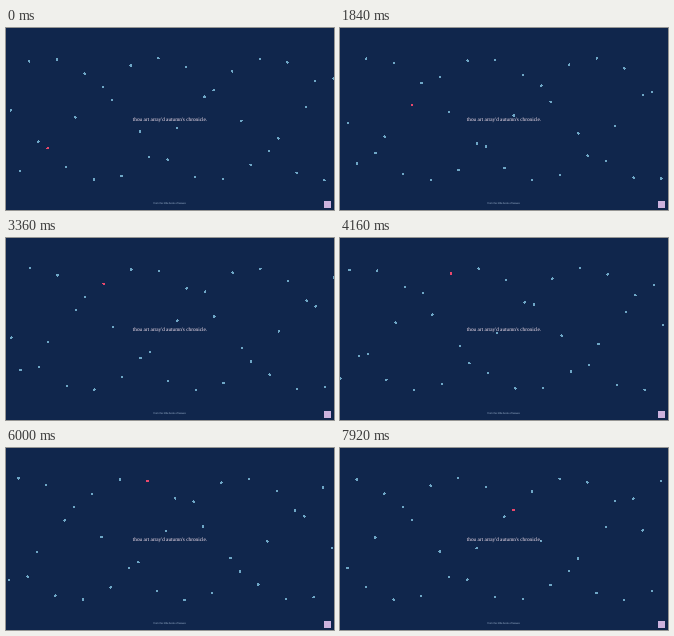
An HTML page for the animation above (8 s loop, 328x182 px).

```html
<!DOCTYPE html>
<html lang="en">
<head>
<meta charset="utf-8">
<title>Drifting dots</title>
<style>
  html, body { margin: 0; height: 100%; overflow: hidden; background: #10264c; }
  svg { display: block; width: 100vw; height: 100vh; }
  text { text-anchor: middle; text-rendering: geometricPrecision; }
  circle, rect { shape-rendering: crispEdges; }
  .dot { fill: #6ea6c6; }
  .lead { fill: #e8486c; }
  .verse { font: 5.27px "Liberation Serif", serif; fill: #fbe8f4; }
  .note { font: 2.6px "Liberation Sans", sans-serif; fill: #a3bad4; }
  .badge { fill: #ccb2de; }
</style>
</head>
<body>
<svg viewBox="0 0 328 182">
  <g id="dots"></g>
  <text class="verse" x="164" y="92.9">thou art array'd autumn's chronicle.</text>
  <text class="note" x="163.7" y="176.2">from the little book of leaves</text>
  <rect class="badge" x="318" y="173" width="7" height="7"/>
</svg>
<script>
  const LOOP = 8000, STEP = 80;
  const COUNT = 36, LEAD = 4;
  const SPAN = 332, EDGE = 2;           // wrap width and overhang
  const START = 4.8, SPEED = 16.65;     // px, px per second
  const MID = 91.2, AMP = 61;
  const TURN = 130 * Math.PI / 180;     // phase between neighbours
  const PHASE = -2.066, RATE = 0.3966;  // rad, rad per second

  const group = document.getElementById('dots');
  const dots = Array.from({ length: COUNT }, (_, i) => {
    const dot = document.createElementNS('http://www.w3.org/2000/svg', 'circle');
    dot.setAttribute('class', i === LEAD ? 'lead' : 'dot');
    dot.setAttribute('r', 1.3);
    return group.appendChild(dot);
  });

  // The motion stalls twice near the start of the loop.
  function heldTime(ms) {
    const t = Math.floor(ms % LOOP / STEP) * STEP;
    if (t < 640) return Math.min(t, 240);
    return t < 1200 ? 640 : t;
  }

  function draw() {
    const t = heldTime(performance.now()) / 1000;
    dots.forEach((dot, i) => {
      const x = (START + i * SPAN / COUNT + SPEED * t + EDGE) % SPAN - EDGE;
      const angle = PHASE + (i - LEAD) * TURN + RATE * t;
      dot.setAttribute('cx', x.toFixed(2));
      dot.setAttribute('cy', (MID - AMP * Math.cos(angle)).toFixed(2));
    });
    requestAnimationFrame(draw);
  }
  draw();
</script>
</body>
</html>
```
